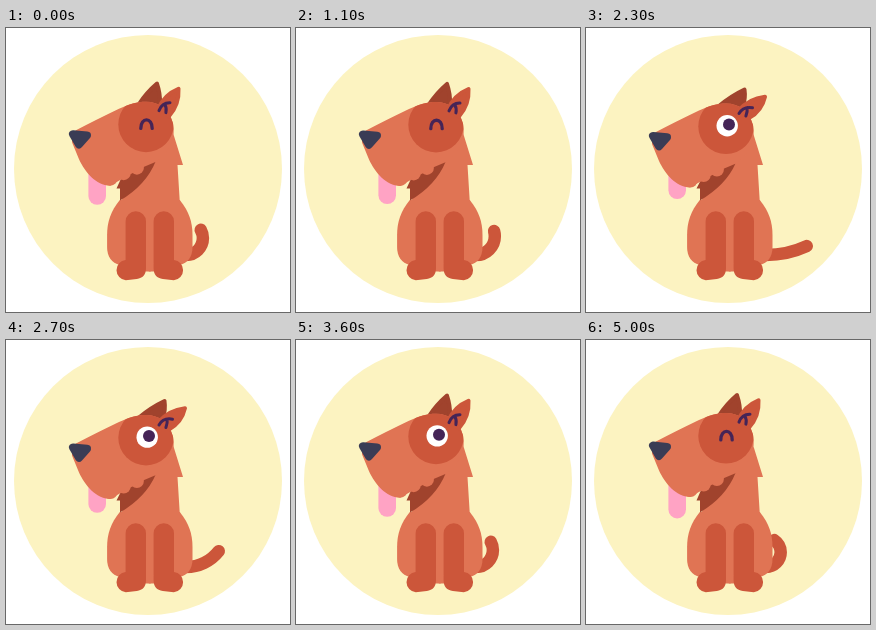
Recreate the animation shown at these times as an HTML page with a canvas. Size 284 by 284 pixels, loop 5100 ms.

```html
<!DOCTYPE html>
<html>
<head>
<meta charset="utf-8">
<style>
html, body { margin: 0; width: 100%; height: 100%; overflow: hidden; background: #fff; }
canvas { display: block; width: 284px; height: 284px; }
</style>
</head>
<body>
<canvas id="stage"></canvas>
<script>
const LOOP = 5100, STEP = 100, WAG = 360;
const canvas = document.getElementById('stage');
const ratio = window.devicePixelRatio || 1;
canvas.width = canvas.height = Math.round(284 * ratio);
const ctx = canvas.getContext('2d');

const color = {
  sky: '#fcf3c1', fur: '#e07454', patch: '#cc563a', shade: '#a0432d',
  tongue: '#ffa3c4', nose: '#3a3c55', line: '#452457'
};

const lerp = (a, b, k) => a + (b - a) * k;
const ramp = (t, from, to) => Math.max(0, Math.min(1, (t - from) / (to - from)));

function fill(path, style) {
  ctx.fillStyle = style;
  ctx.fill(new Path2D(path));
}

function stroke(path, style, width) {
  ctx.strokeStyle = style;
  ctx.lineWidth = width;
  ctx.stroke(new Path2D(path));
}

function disc(x, y, r, style) {
  ctx.fillStyle = style;
  ctx.beginPath();
  ctx.arc(x, y, r, 0, Math.PI * 2);
  ctx.fill();
}

// Fills a half shape on both sides of the body's axis
function fillMirrored(half, style) {
  for (const side of [-1, 1]) {
    ctx.save();
    ctx.translate(143.8, 0);
    ctx.scale(side, 1);
    fill(half, style);
    ctx.restore();
  }
}

// The tail is one arc: curling in turns it further round
function drawTail(curl) {
  const turn = 0.43 + 2.12 * curl;
  const length = 42 - 24 * curl + 19.5 * curl * curl;
  const r = length / turn;
  ctx.beginPath();
  ctx.arc(180, 227 - r, r, Math.PI / 2, Math.PI / 2 - turn, true);
  ctx.strokeStyle = color.patch;
  ctx.lineWidth = 12.5;
  ctx.stroke();
}

function drawBody() {
  fill('M114 174L150 128L163 98L168 108L177 137H171.5L173.8 174Z', color.fur);
  fillMirrored('M-1 172H30C39 183 42.7 194 42.7 207V219C42.7 229 38 235 30 237L4 243.5H-1Z', color.fur);
}

function drawLegs() {
  fillMirrored('M3.8 193.5A10.2 10.2 0 0 1 24.2 193.5V232A10.2 10.2 0 0 1 24 252.3' +
    'L13 251C7 250 3.8 247 3.8 240Z', color.patch);
}

function drawThroat(dy) {
  fill(`M149.5 ${135.5 + dy}Q140 157 114 172.5V160.5H110.5L117 ${148 + dy}L130 ${138 + dy}Z`, color.shade);
}

// A leaf with a rounded tip; bulge pushes both sides outwards
function drawEar(left, tip, right, bulge, style) {
  const bow = (a, b) => {
    const dx = b[0] - a[0], dy = b[1] - a[1], k = bulge / Math.hypot(dx, dy);
    return [(a[0] + b[0]) / 2 + dy * k, (a[1] + b[1]) / 2 - dx * k];
  };
  const path = `M${left}Q${bow(left, tip)} ${tip}Q${bow(tip, right)} ${right}Z`;
  fill(path, style);
  stroke(path, style, 4);
}

function drawBackEar(fold) {
  drawEar([133, 78], [lerp(151, 158.5, fold), lerp(57.5, 61.5, fold)], [lerp(154, 157, fold), 78], 2, color.shade);
}

function drawFrontEar(fold) {
  drawEar([152, 83], [lerp(172.5, 179, fold), lerp(62.7, 68.7, fold)], [163, 90], 6, color.patch);
  const x = 2.5 * fold, y = 3 * fold;
  stroke(`M153 ${84.5 + y / 3}Q${156 + x / 2} ${76.5 + y / 2} ${164 + x} ${76.7 + y}` +
    `M${158.7 + x} ${78.2 + y / 2}Q${161 + x / 4} ${82 + y / 3} ${159.9} ${86.5 + y / 2}`, color.line, 3);
}

function drawHead(t, curl) {
  const folding = ramp(t, 1350, 1500);
  const skull = new Path2D('M66 108L70 104Q89 94 113 82.5C123 78 131 75.5 140 75.5C153 75.5 163 83 167 97' +
    'C170 112 164 126 150 135.5L137 141L104 159.5C90 159 79 146 73 133L66 116Z');

  drawBackEar(folding - ramp(t, 3200, 3400));
  for (let i = 0; i < 3; i++) disc(104.5 + 13.2 * i, 152.5 - 5.5 * i, 7, color.fur);
  ctx.fillStyle = color.fur;
  ctx.fill(skull);
  ctx.save();
  ctx.clip(skull);
  disc(140, 98.3, 27.7, color.patch);
  ctx.restore();
  drawFrontEar(folding - ramp(t, 3080, 3290));

  if (t >= 1950 && t < 4550) {
    disc(141.2, 97.7, 10.7, '#fff');
    disc(143, 96.5, 6, color.line);
  } else {
    stroke('M134.8 102.3C134.8 91 146.2 91 146.2 102.3', color.line, 3.3);
  }

  const nose = 'M67 108L81 109.3L73 118.3Z';
  fill(nose, color.nose);
  stroke(nose, color.nose, 8);
}

function draw(t) {
  const phase = ((t - 500) / WAG % 1 + 1) % 1;
  const curl = 1 - Math.abs(1 - 2 * phase);
  const dy = -2.4 * curl;

  ctx.setTransform(ratio, 0, 0, ratio, 0, 0);
  ctx.lineCap = ctx.lineJoin = 'round';
  ctx.fillStyle = '#fff';
  ctx.fillRect(0, 0, 284, 284);
  disc(142, 141, 134, color.sky);

  drawTail(curl);
  drawBody();
  drawThroat(dy);
  drawLegs();
  stroke(`M91.2 140V${162.3 + 7.3 * curl}`, color.tongue, 17.6);

  ctx.translate(0, dy);
  drawHead(t, curl);
}

const begin = performance.now();
function tick(now) {
  draw(Math.floor(Math.max(0, now - begin) % LOOP / STEP) * STEP);
  requestAnimationFrame(tick);
}
tick(begin);
</script>
</body>
</html>
```
